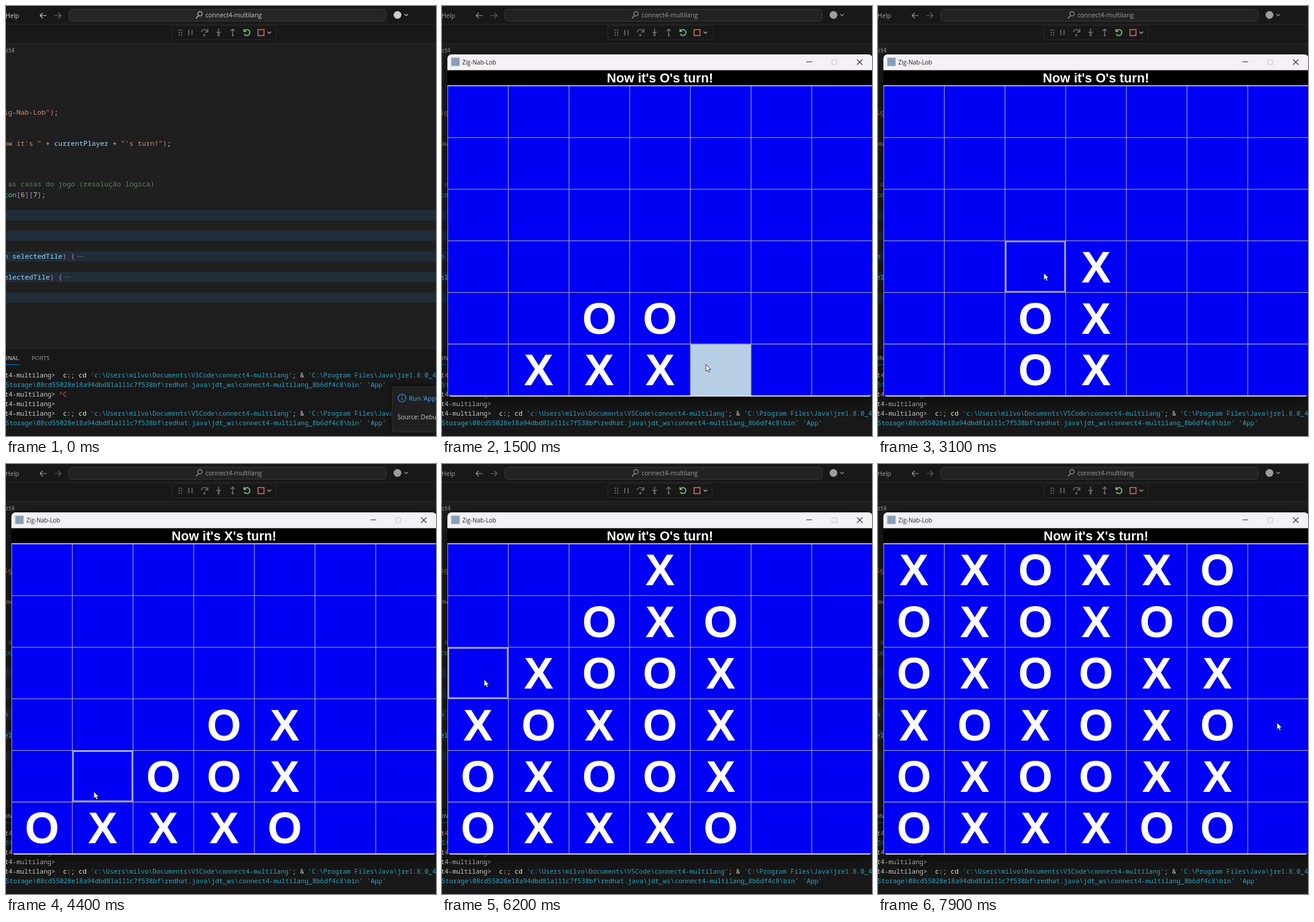
These frames come from a looping animation (720 px wide and 720 px high, 8000 ms). An HTML page with a canvas:

```html
<!DOCTYPE html>
<html lang="pt">
<head>
<meta charset="utf-8">
<title>Four in a row</title>
<style>
html, body { margin: 0; width: 100%; height: 100%; overflow: hidden; background: #1f1f1f; }
canvas { display: block; }
</style>
</head>
<body>
<canvas id="stage" width="720" height="720"></canvas>
<script>
const ctx = document.getElementById('stage').getContext('2d');
const LOOP = 8000, STEP = 100;
const UI = '"Open Sans", "Noto Sans", sans-serif';
const MONO = '"Noto Sans Mono", "DejaVu Sans Mono", monospace';
const BOLD = '"Liberation Sans", Arial, sans-serif';
const GAME = 'Zig-Nab-Lob';

// Board geometry
const LEFT = 9.5, TOP = 134, CW = 101.6, CH = 86.4;

// Columns in order of play; rest gives the pointer's place inside the next cell
const games = [
  { open: 400, close: 2000, moves: '2233140', at: i => 640 + 180 * i, rest: { 5: [26, 34] } },
  { open: 2400, close: 3400, moves: '3232323', at: i => 2610 + 110 * i, rest: { 5: [65, 54] } },
  { open: 3500, close: LOOP, moves: '2233144043' + '1123324410023' + '0100215555545',
    at: i => i < 10 ? 3600 + 86 * i : 4520 + 134 * (i - 10),
    rest: { 10: [36, 69], 23: [61, 54] } }
];

function box(x, y, w, h, fill, stroke, r = 0) {
  ctx.beginPath();
  ctx.roundRect(x, y, w, h, r);
  if (fill) { ctx.fillStyle = fill; ctx.fill(); }
  if (stroke) { ctx.strokeStyle = stroke; ctx.stroke(); }
}

function path(d, color, width = 1.2) {
  ctx.strokeStyle = color;
  ctx.lineWidth = width;
  ctx.stroke(new Path2D(d));
  ctx.lineWidth = 1;
}

function dot(x, y, r, color) {
  ctx.beginPath();
  ctx.arc(x, y, r, 0, 7);
  ctx.fillStyle = color;
  ctx.fill();
}

function text(str, x, y, font, color, align = 'left') {
  ctx.font = font;
  ctx.fillStyle = color;
  ctx.textAlign = align;
  ctx.fillText(str, x, y);
}

// Coloured pieces of one line: color, string, color, string, ...
function line(x, y, size, ...parts) {
  const font = `${size}px ${MONO}`;
  for (let i = 0; i < parts.length; i += 2) {
    text(parts[i + 1], x, y, font, parts[i]);
    x += ctx.measureText(parts[i + 1]).width;
  }
}

function drawHeader(active) {
  const ink = active ? '#cccccc' : '#9d9d9d';
  box(0, 0, 720, 63, '#181818');
  box(0, 30, 720, 1, '#2b2b2b');
  box(0, 62, 720, 1, '#2b2b2b');
  text('Help', -1, 20, `10.7px ${UI}`, ink);
  path('M68 16H57M61.5 11.5L57 16L61.5 20.5', ink);
  path('M81 16H92M87.5 11.5L92 16L87.5 20.5', active ? '#777' : '#666');
  box(105.5, 5.5, 531, 20, active ? '#252525' : '#222222', '#3a3a3a', 5);
  path('M328.5 13A3.7 3.7 0 1 1 321.1 13A3.7 3.7 0 1 1 328.5 13M322.3 16L318 21', ink);
  text('connect4-multilang', 334, 19, `10.5px ${UI}`, ink);
  dot(655.5, 15, 6.5, ink);
  path('M667 13.5L670 16.5L673 13.5', ink);

  box(277.5, 32.5, 175, 24, '#181818', '#2b2b2b', 4);
  for (let i = 0; i < 6; i++) dot(290 + i % 2 * 4, 40.5 + (i >> 1) * 4, 1, '#888');
  path('M306 40V49M311.5 40V49', '#777', 1.5);
  path('M327 44C328 38 335 38 338 43M338 38.5V43.5H333', '#777', 1.4);
  path('M356 38V46M352.5 43L356 46.5L359.5 43', '#777', 1.4);
  path('M379.5 47V39M376 42L379.5 38.5L383 42', '#777', 1.4);
  for (const x of [332, 356, 379.5]) dot(x, 49, 1.7, '#777');
  path('M399 42A5 5 0 1 1 399 47M398.5 38.5V42.5H402.5', '#7fcf8a', 1.6);
  path('M422 39.5H432V49.5H422Z', '#e0705f', 1.5);
  path('M438 43L441 46L444 43', '#bbb');
}

function drawEditor() {
  const str = '#ce9178', plain = '#d4d4d4', name = '#9cdcfe', pink = '#c978cf', num = '#b5cea8';
  const x = -3.4, size = 11.67;
  box(0, 63, 720, 510, '#1f1f1f');
  text('ct4', 0, 78, `10.3px ${UI}`, '#a0a0a0');
  for (const y of [342, 376.5, 411, 445, 480]) box(0, y, 720, 17, '#202d39');
  line(x, 182, size, str, GAME.slice(1) + '"', pink, ')', plain, ';');
  line(x, 234, size, str, 'ow it\'s "', plain, ' + ', name, 'currentPlayer', plain, ' + ',
    str, '"\'s turn!"', pink, ')', plain, ';');
  line(x, 302, size, '#5f8760', ' as casas do jogo (resolução lógica)');
  line(x, 320, size, '#4ec9b0', 'ton', pink, '[', num, '6', pink, '][', num, '7', pink, ']', plain, ';');
  line(x, 423, size, '#4ec9b0', 'n ', name, 'selectedTile', pink, ') {');
  line(x, 458, size, name, 'electedTile', pink, ') {');
  for (let i = 0; i < 3; i++) {
    dot(120.5 + i * 3.5, 419.5, 0.8, '#888');
    dot(99.5 + i * 3.5, 454, 0.8, '#888');
  }
}

function drawTerminal() {
  const ink = '#cccccc', cmd = '#f3f1c8', arg = '#29a3c8', size = 10.85, x = -2;
  const prompt = 't4-multilang>';
  box(0, 573, 720, 147, '#181818');
  box(0, 573, 720, 1, '#2b2b2b');
  text('TERMINAL', 21.5, 592.5, `9.7px ${UI}`, '#dddddd', 'right');
  text('PORTS', 43, 592.5, `9.7px ${UI}`, '#9d9d9d');
  box(0, 600, 23, 1, '#0078d4');
  for (const y of [622, 686]) {
    line(x, y, size, ink, prompt + '  ', cmd, 'c:', ink, '; ', cmd, 'cd ',
      arg, "'c:\\Users\\milvo\\Documents\\VSCode\\connect4-multilang'", ink, '; & ',
      arg, "'C:\\Program Files\\Java\\jre1.8.0_4");
    line(-1, y + 16, size, arg, 'Storage\\08cd55028e18a94dbd81a111c7f538bf\\redhat.java\\jdt_ws\\' +
      "connect4-multilang_8b6df4c8\\bin' 'App'");
  }
  line(x, 654, size, ink, prompt + ' ', '#d9534a', '^C');
  line(x, 670, size, ink, prompt);
}

function drawNotice() {
  ctx.save();
  ctx.shadowColor = '#000a';
  ctx.shadowBlur = 8;
  box(646, 637, 90, 77, '#202020', null, 4);
  ctx.restore();
  box(646.5, 637.5, 90, 76, null, '#303030', 4);
  path('M669.5 656.5A6.5 6.5 0 1 1 656.5 656.5A6.5 6.5 0 1 1 669.5 656.5M663 655.5V660M663 652.5V654', '#3794ff');
  text("Run 'App'", 674.5, 661, `11px ${UI}`, '#4da3ff');
  text('Source: Debugger', 655.5, 692, `10.5px ${UI}`, '#cccccc');
}

function drawWindow(count, marks, hover, pressed) {
  ctx.save();
  ctx.shadowColor = '#000c';
  ctx.shadowBlur = 26;
  ctx.shadowOffsetY = 4;
  box(9, 81, 712, 573, '#f3f1f5', null, 7);
  ctx.restore();

  ctx.save();
  ctx.beginPath();
  ctx.roundRect(9, 81, 712, 573, 7);
  ctx.clip();
  box(15.5, 86.5, 14, 14, '#8a9fb5');
  text(GAME, 34, 97.5, `10px ${UI}`, '#222222');
  path('M610 93.5H620', '#333', 1.1);
  path('M653 90H661V98H653Z', '#c4c2c6', 1);
  path('M695 89.5L704 98.5M704 89.5L695 98.5', '#333', 1.1);

  box(9, 107.5, 712, 26, '#000');
  text(`Now it's ${'XO'[count % 2]}'s turn!`, 365, 127.7, `bold 21.7px ${BOLD}`, '#fff', 'center');
  box(9, TOP, 712, 518.5, '#0000f5');

  const cell = (c, r) => [LEFT + c * CW, TOP + (5 - r) * CH];
  if (pressed) box(...cell(...hover), CW, CH, '#b8cfe5');
  let grid = '';
  for (let c = 0; c < 8; c++) grid += `M${LEFT + c * CW} ${TOP}V652.5`;
  for (let r = 1; r < 6; r++) grid += `M9 ${TOP + r * CH}H721`;
  path(grid, '#9292b0', 1.3);
  path('M9 133.5H721M9 653H721', '#e4e4ea', 1.6);
  if (hover && !pressed) {
    const [x, y] = cell(...hover);
    ctx.lineWidth = 2.2;
    box(x + 1.3, y + 1.3, CW - 2.6, CH - 2.6, null, '#b0b0c8');
    ctx.lineWidth = 1;
  }
  for (const [c, r, who] of marks) {
    const [x, y] = cell(c, r);
    text(who, x + CW / 2, y + CH / 2 + 26.2, `bold 74px ${BOLD}`, '#fff', 'center');
  }
  ctx.restore();
}

function drawPointer(x, y) {
  const p = new Path2D('M0 0V11.5L2.7 9.2L4.5 13.3L6.6 12.3L4.8 8.4H8.3Z');
  ctx.save();
  ctx.translate(x, y);
  ctx.fillStyle = '#fff';
  ctx.strokeStyle = '#223';
  ctx.lineWidth = 0.9;
  ctx.fill(p);
  ctx.stroke(p);
  ctx.restore();
}

// Lets each move fall on top of its column
function replay(game) {
  const height = Array(7).fill(0);
  return [...game.moves].map((c, i) => [+c, height[c]++, 'XO'[i % 2]]);
}

function pointerAt(game, plan, i) {
  if (i < 0) return [352, 555];
  if (i >= plan.length) return [668, 433];
  const [c, r] = plan[i], [dx, dy] = game.rest[i] || [42 + i * 17 % 25, 44 + i * 11 % 23];
  return [LEFT + c * CW + dx, TOP + (5 - r) * CH + dy];
}

function drawGame(game, t) {
  const plan = replay(game);
  const opening = t < game.open + STEP;
  let count = 0;
  while (count < plan.length && game.at(count) <= t) count++;

  const since = count ? game.at(count - 1) : game.open + STEP;
  const until = game.at(count);
  const k = Math.max(0, Math.min(1, (t - since) / (until - since) / 0.15));
  const a = pointerAt(game, plan, count - 1), b = pointerAt(game, plan, count);
  const pos = opening ? a : a.map((v, i) => v + (b[i] - v) * k);
  const next = plan[count];
  const hover = opening ? [3, 1] : next && k === 1 ? next : null;
  const pressed = !opening && hover && until - t < 48;

  ctx.save();
  if (opening) {
    ctx.translate(364, 367);
    ctx.scale(0.975, 0.975);
    ctx.translate(-364, -367);
  }
  drawWindow(count, plan.slice(0, count), hover, pressed);
  ctx.restore();
  drawPointer(...(next ? pos : b));
}

function draw(t) {
  const game = games.find(g => t >= g.open && t < g.close);
  drawEditor();
  drawHeader(!game);
  drawTerminal();
  if (game) drawGame(game, t);
  else drawNotice();
}

const start = performance.now();
function tick() {
  const t = (performance.now() - start) % LOOP;
  draw(Math.floor(t / STEP) * STEP);
  requestAnimationFrame(tick);
}
tick();
</script>
</body>
</html>
```
